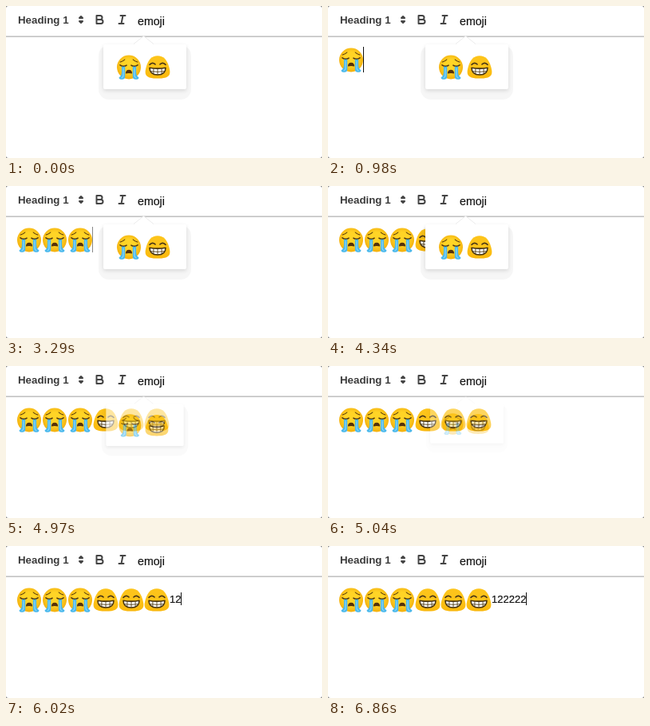
An HTML page that plays this animation: 396 by 190 pixels, repeating every 6.93 s.

```html
<!DOCTYPE html>
<html lang="en">
<head>
<meta charset="utf-8">
<title>Emoji editor</title>
<style>
  html, body { margin: 0; width: 100%; height: 100%; overflow: hidden; background: #777; }
  #stage { position: relative; width: 396px; height: 190px; overflow: hidden; background: #fff; border-radius: 3px; }
  svg { position: absolute; left: 0; top: 0; overflow: visible; }
  text { font-family: "Liberation Sans", Arial, sans-serif; fill: #111; stroke: #111; stroke-width: .2; }
  .heading { font-weight: 700; fill: #3a3a3a; stroke: none; }
  .icon { fill: none; stroke: #444; stroke-width: 2; stroke-linecap: round; stroke-linejoin: round; }
  #popup { position: absolute; left: 122px; top: 48px; width: 104px; height: 56px; transform-origin: 52px -6px; }
  #halo { position: absolute; inset: 1px -6px -13px; border-radius: 13px; background: rgba(0, 0, 0, .035); }
  #panel { position: absolute; inset: 0; background: #fff; border-radius: 2px; box-shadow: 0 2px 5px rgba(0, 0, 0, .12); }
</style>
</head>
<body>
<div id="stage">
  <svg width="396" height="190">
    <defs>
      <radialGradient id="skin" cy=".45" r=".55">
        <stop offset=".5" stop-color="#ffd426"/>
        <stop offset="1" stop-color="#f3ae0c"/>
      </radialGradient>
      <linearGradient id="blob" x2="0" y2="1">
        <stop offset=".4" stop-color="#fdc41a"/>
        <stop offset="1" stop-color="#fab80c"/>
      </linearGradient>
      <g id="cry">
        <circle cx="16" cy="15.5" r="15" fill="url(#skin)"/>
        <g fill="none" stroke="#4f340c" stroke-linecap="round">
          <path d="M5.2 9Q8.6 8.4 10.8 6M26.8 9Q23.4 8.4 21.2 6" stroke-width="1.1"/>
          <path d="M5 12.8Q9 15.4 13 13.2M19 13.2Q23 15.4 27 12.8" stroke-width="1.6"/>
        </g>
        <path d="M11.9 23.6Q11.9 18.8 16 18.8T20.1 23.6Q16 22.2 11.9 23.6Z" fill="#55330b"/>
        <g fill="#4ab8ec">
          <path id="tear" d="M6.9 14.4Q9 15.3 11.2 14.4V27Q11.2 30.8 7.6 30.8Q3.4 30.8 3.6 28.2Q6.9 26.4 6.9 22Z"/>
          <use href="#tear" transform="matrix(-1 0 0 1 32 0)"/>
        </g>
        <path d="M9 16.5V26Q8.8 28.4 6.6 29M23 16.5V26Q23.2 28.4 25.4 29" fill="none" stroke="#8fd8f7" stroke-width="1.2"/>
      </g>
      <g id="grin">
        <path d="M16 1.3C8.4 1.3 4.4 6.5 1.9 14.5C-1.2 25 .6 29.6 16 29.6S33.2 25 30.1 14.5C27.6 6.5 23.6 1.3 16 1.3Z" fill="url(#blob)"/>
        <path d="M6 12.4Q9.4 8.6 13 11.9M19 11.9Q22.6 8.6 26 12.4" fill="none" stroke="#4a3716" stroke-width="1.6" stroke-linecap="round"/>
        <path d="M6 16.3Q16 18 26 16.3Q26 25 16 25T6 16.3Z" fill="#fff" stroke="#47330f" stroke-width="1.6" stroke-linejoin="round"/>
        <path d="M7 20.5Q16 22.2 25 20.5M10.9 17V23.8M16 17.3V25M21.1 17V23.8" fill="none" stroke="#55421c" stroke-width=".9"/>
      </g>
    </defs>

    <rect y="37.4" width="396" height="1.5" fill="#bebebe"/>
    <text class="heading" x="15" y="22" font-size="13.3">Heading 1</text>
    <path transform="translate(85 8)" fill="#444" stroke="#444" stroke-width="2" stroke-linejoin="round"
      d="M7 11L9 13L11 11ZM7 7L9 5L11 7Z"/>
    <path class="icon" transform="translate(108.5 8)"
      d="M5 4H9.5A2.5 2.5 0 0 1 9.5 9H5ZM5 9H10.5A2.5 2.5 0 0 1 10.5 14H5Z"/>
    <path class="icon" transform="translate(136.5 8)" d="M7 4H13M5 14H11M8 14L10 4"/>
    <text x="165" y="24" font-size="14.2">emoji</text>

    <g id="faces"></g>
    <text id="typed" x="205" y="71" font-size="13"></text>
    <rect id="caret" width="1" fill="#111"/>
  </svg>

  <div id="popup">
    <div id="halo"></div>
    <div id="panel"></div>
    <svg width="104" height="56">
      <path d="M38 1L50.5 -10.5L63 1Z" fill="#fff"/>
      <path d="M38 -.5L50.5 -10.5L63 -.5" fill="none" stroke="#ececec"/>
      <use href="#cry" x="16" y="13"/>
      <use href="#grin" x="52" y="13"/>
    </svg>
  </div>
</div>

<script>
  const LOOP = 6930, LEFT = 13, FACE = 32, DIGIT = 7.23;
  const $ = id => document.getElementById(id);

  // Each table holds [start time, value] steps.
  const count = [[0, 0], [980, 1], [1680, 2], [2450, 3], [3570, 4], [4130, 5], [4550, 6]];
  const caretOn = [
    [0, 0], [490, .5], [630, 1], [1400, .5], [1540, 0], [1680, 1], [2100, .5], [2240, 0],
    [2450, 1], [2800, .5], [2940, 0], [3290, .5], [3430, 1], [3920, 0],
    [5460, .5], [5600, 1]
  ];
  const leave = [[0, 0], [4900, .1], [4970, .32], [5040, .58], [5110, .85], [5180, 1]];
  const typed = [[0, ""], [5880, "1"], [6020, "12"], [6160, "122"], [6510, "1222"], [6650, "12222"], [6860, "122222"]];

  function at(steps, t) {
    let value = steps[0][1];
    for (const [start, v] of steps) if (t >= start) value = v;
    return value;
  }

  const faces = Array.from({ length: 6 }, (_, i) => {
    const face = document.createElementNS("http://www.w3.org/2000/svg", "use");
    face.setAttribute("href", i < 3 ? "#cry" : "#grin");
    face.setAttribute("x", LEFT + i * FACE);
    face.setAttribute("y", 52);
    return $("faces").appendChild(face);
  });

  function draw(t) {
    const n = at(count, t), text = at(typed, t), gone = at(leave, t);
    faces.forEach((face, i) => face.style.display = i < n ? "" : "none");
    $("typed").textContent = text;

    const tall = n > 0 && !text;
    const caret = $("caret");
    caret.setAttribute("x", Math.round(LEFT + n * FACE + text.length * DIGIT - (tall ? 1 : 0)));
    caret.setAttribute("y", text ? 58 : tall ? 51 : 52);
    caret.setAttribute("height", tall ? 32 : 16);
    caret.style.opacity = at(caretOn, t);

    const popup = $("popup").style;
    popup.opacity = (1 - gone) ** 1.4;
    popup.transform = `scale(${1 - .2 * gone})`;
  }

  const begin = performance.now();
  function tick() {
    draw((performance.now() - begin) % LOOP);
    requestAnimationFrame(tick);
  }
  tick();
</script>
</body>
</html>
```
